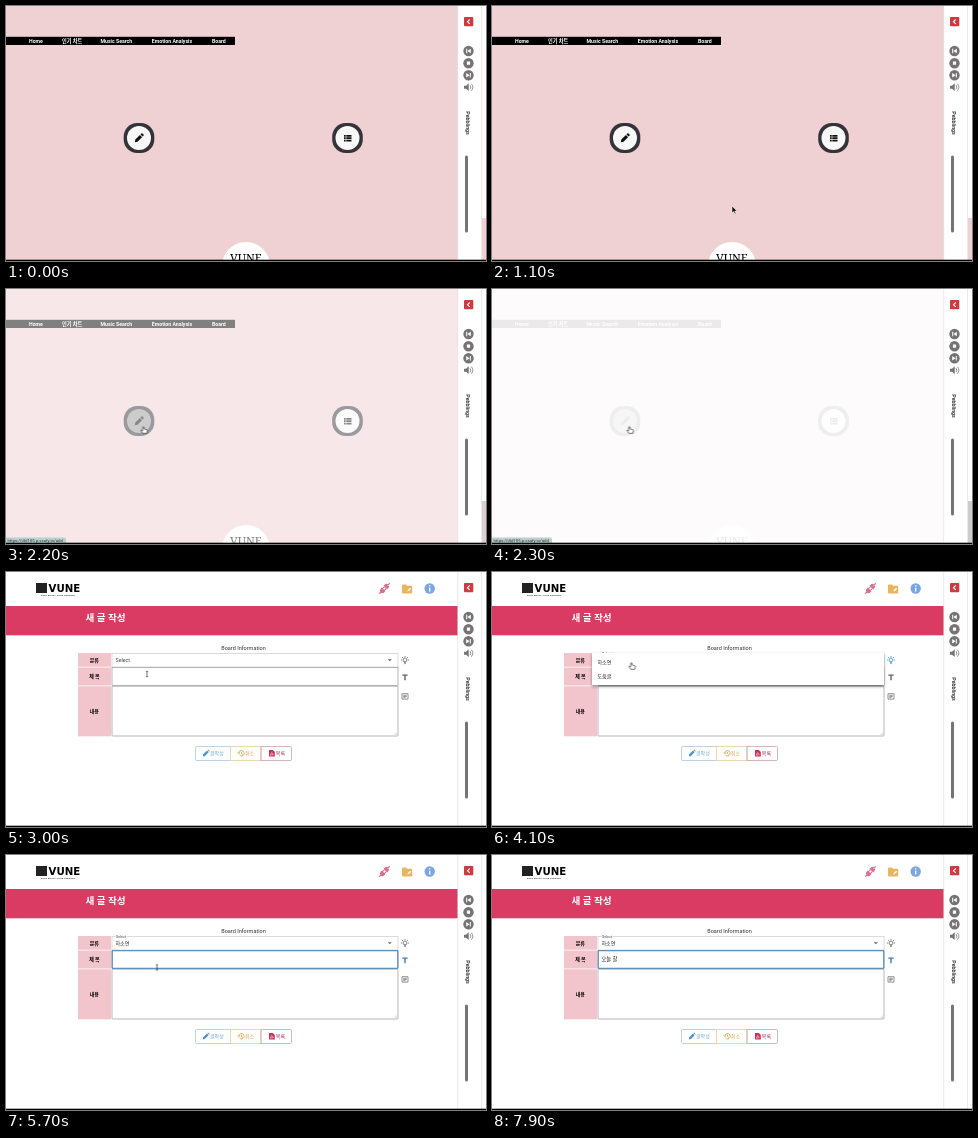
An HTML page for the animation above (8000 ms loop, 480x255 px).

```html
<!DOCTYPE html>
<html lang="ko">
<head>
<meta charset="utf-8">
<title>Board</title>
<style>
html, body { margin: 0; width: 100%; height: 100%; overflow: hidden; background: #fff; }
#stage { position: absolute; left: 0; top: 0; width: 480px; height: 255px; overflow: hidden; }
svg { display: block; }
text, #typed { font-family: Roboto, "Noto Sans CJK KR", "Noto Sans CJK", sans-serif; }
.mid { text-anchor: middle; }
.nav text { font-size: 5.2px; font-weight: 700; fill: #fff; }
.serif { font: 11.5px "Noto Serif", "Liberation Serif", serif; }
.brand { font: 700 10.2px "DejaVu Sans", sans-serif; }
.cells rect { fill: #f2c4cb; }
.cells text { font-size: 5px; font-weight: 900; text-anchor: middle; }
.small { font-size: 5px; fill: #222; }
.box { fill: #fff; stroke: #999; stroke-width: .7; }
.btn { font-size: 5px; }

.a { animation: 8s linear infinite; }
.step { animation-timing-function: step-end; }
.home { animation-name: home; }
.board { animation-name: board; }
.hover { animation-name: hover; }
.status { animation-name: status; }
.thumb { animation-name: thumb; }
.menu { animation-name: menu; transform-origin: 246px 88px; }
.label { animation-name: label; }
.value { animation-name: value; }
.bulb { animation-name: bulb; }
.tee { animation-name: tee; }
.focus { animation-name: value; animation-name: focus; }
.cursor { animation-name: move; animation-timing-function: ease-in-out; }
.arrow { animation-name: arrow; }
.hand { animation-name: hand; }
.beam { animation-name: beam; }

@keyframes home { 0%, 26.4% { opacity: 1 } 27.5% { opacity: .5 } 28.75% { opacity: .08 } 30%, 100% { opacity: 0 } }
@keyframes board { 0%, 31% { opacity: 0 } 35%, 100% { opacity: 1 } }
@keyframes hover { 0%, 24.8% { fill: #f8f8f8 } 26%, 100% { fill: #999 } }
@keyframes status { 0%, 25% { opacity: 0 } 26.25% { opacity: .45 } 27.5%, 35.5% { opacity: 1 } 36.25%, 100% { opacity: 0 } }
@keyframes thumb { 0%, 26.4% { fill: #efd0d3; opacity: 1 } 28.75%, 33.7% { fill: #ccc; opacity: 1 } 35%, 100% { fill: #ccc; opacity: 0 } }
@keyframes menu {
  0%, 41.25% { opacity: 0; transform: scale(.75, .56) }
  44%, 57.5% { opacity: 1; transform: none }
  60%, 100% { opacity: 0; transform: scale(.75, .56) }
}
@keyframes label {
  0%, 41.25% { transform: translate(109.5px, 90px); font-size: 5.3px }
  43.7%, 100% { transform: translate(110px, 83.2px); font-size: 3.7px }
}
@keyframes value { 0% { opacity: 0 } 57.5%, 100% { opacity: 1 } }
@keyframes focus { 0% { opacity: 0 } 70%, 100% { opacity: 1 } }
@keyframes bulb { 0% { color: #666 } 41.25% { color: #3f8fd0 } 70%, 100% { color: #666 } }
@keyframes tee { 0% { color: #666 } 70%, 100% { color: #3f7fb8 } }
@keyframes move {
  0%, 13.75% { transform: translate(240px, 200px) }
  24.5%, 32% { transform: translate(137.5px, 138px) }
  37%, 38% { transform: translate(141px, 102px) }
  41%, 44% { transform: translate(141px, 88px) }
  51.25%, 58.5% { transform: translate(139.5px, 91px) }
  68%, 100% { transform: translate(151px, 112.5px) }
}
@keyframes arrow { 0% { opacity: 0 } 13.75% { opacity: 1 } 25%, 100% { opacity: 0 } }
@keyframes hand { 0% { opacity: 0 } 25% { opacity: 1 } 34.5% { opacity: 0 } 40% { opacity: 1 } 62%, 100% { opacity: 0 } }
@keyframes beam { 0% { opacity: 0 } 34.5% { opacity: 1 } 40% { opacity: 0 } 62% { opacity: 1 } 81.25%, 100% { opacity: 0 } }

#typed { position: absolute; left: 109.5px; top: 100px; font-size: 5.3px; line-height: 8px; white-space: pre; color: #111; }
#typed::after { content: ""; animation: type 8s step-end infinite; }
@keyframes type {
  0% { content: "" }
  81.25% { content: "ㅇ" }
  83.75% { content: "오" }
  86.25% { content: "온" }
  88.75% { content: "오느" }
  91.25% { content: "오늘" }
  93.75% { content: "오늘 " }
  95% { content: "오늘 ㅎ" }
  96.25% { content: "오늘 하" }
  98.75%, 100% { content: "오늘 할" }
}
</style>
</head>
<body>
<div id="stage">
<svg width="480" height="255" viewBox="0 0 480 255">
  <defs>
    <filter id="shadow" x="-5%" y="-20%" width="110%" height="160%">
      <feDropShadow dx="0" dy="1.5" stdDeviation="1.5" flood-opacity=".4"/>
    </filter>
  </defs>
  <rect width="480" height="255" fill="#fff"/>

  <!-- board form -->
  <g class="a board">
    <rect x="30" y="11" width="11" height="10" fill="#222"/>
    <text class="brand" x="42.5" y="20">VUNE</text>
    <text x="52" y="23.6" class="mid" font-size="2.4" font-weight="700" fill="#444" letter-spacing=".15">SING ENJOY YOUR EVENING</text>

    <g transform="translate(378.5 16.5) rotate(45)" fill="#d8708c">
      <path d="M-2.6-1.2h5.2v-1.6a2.6 2.6 0 0 0-5.2 0zM-.6-7.4h1.2v3h-1.2zM-2.6 1.2h5.2v1.6a2.6 2.6 0 0 1-5.2 0zM-.6 4.6h1.2v2.8h-1.2zM-1.8-1.4h1v3h-1zM.8-1.4h1v3h-1z"/>
    </g>
    <path d="M396 13.5q0-1 1-1h3l1.2 1.3h4q1 0 1 1v5.7q0 1-1 1h-8.200q-1 0-1-1z" fill="#e9b55e"/>
    <path d="M401.500 19.500l.3-1.400 2.400-2.400 1 1-2.400 2.400z" fill="#fff"/>
    <circle cx="423.7" cy="16.500" r="5.200" fill="#7ba6de"/>
    <path d="M423 15.700h1.400v3.700H423zM423 13.200h1.400v1.400H423z" fill="#fff"/>

    <rect y="34" width="452" height="29.300" fill="#d93b62"/>
    <text x="79.500" y="49" font-size="9.600" font-weight="900" fill="#fff">새 글 작성</text>
    <text class="mid" x="237.500" y="78.300" font-size="5.500" fill="#333">Board Information</text>

    <g class="cells">
      <rect x="72" y="81" width="33" height="13.700"/>
      <rect x="72" y="95.500" width="33" height="18"/>
      <rect x="72" y="114.300" width="33" height="50"/>
      <text x="88.300" y="89.700">분류</text>
      <text x="88.500" y="106">제 목</text>
      <text x="88.300" y="141">내용</text>
    </g>

    <rect class="box" x="106" y="81.500" width="286" height="13.500" style="stroke:#ccc"/>
    <rect class="box" x="106" y="95.500" width="286" height="18"/>
    <rect class="box" x="106" y="114.200" width="286" height="49.800" rx=".8"/>
    <path d="M388.500 163l2.500-2.500M390 163l1-1" stroke="#999" stroke-width=".4"/>
    <path d="M381.800 87.200h4l-2 2z" fill="#666"/>
    <text class="a label" fill="#444" stroke="#fff" stroke-width="1.200" paint-order="stroke">Select</text>
    <text class="a step value small" x="109.500" y="90">하소연</text>
    <rect class="a step focus" x="106.200" y="95.700" width="285.600" height="17.600" rx=".8" fill="none" stroke="#4a86b8" stroke-width="1.100"/>

    <g class="a step bulb" fill="none" stroke="currentColor" stroke-width=".8">
      <circle cx="399" cy="88" r="1.900"/>
      <path d="M398 90.200h2M398.200 91.600h1.600M399 85.300v-1.300M396.200 88h-1.300M401.800 88h1.300M397 86l-.9-.9M401 86l.9-.9"/>
    </g>
    <path class="a step tee" d="M396.300 102.500h5.400v1.300h-2v4.400h-1.400v-4.400h-2z" fill="currentColor"/>
    <path d="M396 121.700h6v5.400h-6zM397.300 123.300h3.400M397.300 124.500h3.400M397.300 125.700h2.200" fill="none" stroke="#666" stroke-width=".7"/>

    <g fill="none" stroke-width=".7">
      <path d="M224.500 174.500h-34q-1 0-1 1v12q0 1 1 1h34" stroke="#9cc0dc"/>
      <path d="M224.500 174.500h30.500v14h-30.500z" stroke="#e3c48e"/>
      <path d="M255 174.500h29.500q1 0 1 1v12q0 1-1 1H255z" stroke="#c495a4"/>
    </g>
    <path d="M197 184.200v-1.600l4-4 1.600 1.600-4 4zM201.500 178.100l.6-.6 1.600 1.600-.6.600z" fill="#4b93cb"/>
    <text class="btn" x="204" y="183.300" fill="#6ba5d2">글작성</text>
    <path d="M232.800 181.300a2.700 2.700 0 1 1 .8 1.900M231.600 180.500l1.200 1.200 1.200-1.200M235.500 179.800v1.700l1.200.8" fill="none" stroke="#d99a35" stroke-width=".8"/>
    <text class="btn" x="239" y="183.300" fill="#dda44c">취소</text>
    <path d="M263 178h3.800l2 2v4.600H263z" fill="#cf2f58"/>
    <path d="M264.200 183.200l1.500-2.700 1.600 2.200z" fill="none" stroke="#fff" stroke-width=".5"/>
    <text class="btn" x="269.800" y="183.300" fill="#a8375a">목록</text>

    <g class="a menu">
      <rect x="100" y="81" width="292" height="32" fill="#fff" filter="url(#shadow)"/>
      <text class="small" x="105.500" y="92">하소연</text>
      <text class="small" x="105.500" y="105.600">도움글</text>
    </g>
  </g>

  <!-- landing page -->
  <g class="a home">
    <rect width="452" height="254" fill="#efd0d3"/>
    <g class="nav">
      <rect y="30.800" width="229" height="8.200"/>
      <text x="23" y="36.700">Home</text>
      <text x="56" y="36.700">인기 차트</text>
      <text x="94.500" y="36.700">Music Search</text>
      <text x="145.800" y="36.700">Emotion Analysis</text>
      <text x="206" y="36.700">Board</text>
    </g>
    <g fill="#35333a">
      <rect x="117.700" y="117" width="30.600" height="30" rx="13.500"/>
      <rect x="326.200" y="117" width="30.600" height="30" rx="13.500"/>
    </g>
    <circle class="a hover" cx="133" cy="132" r="12" fill="#f8f8f8"/>
    <circle cx="341.500" cy="132" r="12" fill="#f8f8f8"/>
    <path d="M128.800 136.300l.5-2.700 4.600-4.600 2.200 2.200-4.600 4.600zM134.500 128.400l.8-.8q.6-.5 1.200 0l1 1q.5.600 0 1.200l-.8.800z" fill="#111"/>
    <path d="M338 129.800h1.700M338 132.200h1.700M338 134.600h1.700M340.300 129.800h5.200M340.300 132.200h5.200M340.300 134.600h5.200" stroke="#111" stroke-width="1.700"/>
    <circle cx="240" cy="260" r="24" fill="#fff"/>
    <text class="serif mid" x="240" y="255.500">VUNE</text>
  </g>

  <!-- player sidebar -->
  <path d="M451.700 0v254M475.500 0v254" stroke="#e4e2e3" stroke-width=".7"/>
  <rect class="a thumb" x="476" y="212" width="4" height="42"/>
  <rect x="458" y="11" width="9.300" height="9.300" rx="1" fill="#d0393f"/>
  <path d="M463.700 13.500l-2.200 2.200 2.200 2.200" fill="none" stroke="#fff" stroke-width="1.100"/>
  <g fill="#777375">
    <circle cx="462.500" cy="45" r="5.200"/>
    <circle cx="462.500" cy="57.200" r="5.200"/>
    <circle cx="462.500" cy="69.200" r="5.200"/>
    <path d="M458 79.700h2l2.700-2.400v7.800l-2.700-2.400h-2z"/>
    <rect x="459" y="149.500" width="3" height="77" rx="1.500"/>
  </g>
  <path d="M460.200 42.700h1v4.600h-1zM464.800 42.700v4.600l-3.400-2.300zM460.900 55.600h3.200v3.200h-3.200zM460.200 66.900l3.400 2.300-3.400 2.300zM463.800 66.900h1v4.600h-1z" fill="#fff"/>
  <path d="M464 79.200q1.600 2 0 4M465.300 77.700q3.200 3.500 0 7" fill="none" stroke="#777375" stroke-width=".8"/>
  <text transform="translate(460 105.300) rotate(90)" font-size="5.300" font-weight="500" fill="#222">Pebblings</text>

  <g class="a status">
    <path d="M0 248.500h58q2 0 2 2V254H0z" fill="#b9d0cc"/>
    <text x="1.500" y="253.300" font-size="4.300" fill="#234">https://i4d105.p.ssafy.io/add</text>
  </g>

  <g class="a cursor">
    <path class="a step arrow" d="M0 0v7l1.700-1.500 1.100 2.500 1.100-.5-1.100-2.400h2.200z" fill="#111" stroke="#fff" stroke-width=".5"/>
    <path class="a step hand" d="M-.8 0q.8-.8 1.400 0v2l2.700.7q.7.300.6 1.200l-.6 2.400H-.7l-1.900-2.800q.4-.8 1.800.3z" fill="#fff" stroke="#222" stroke-width=".6"/>
    <path class="a step beam" d="M-1.200-2.800q1.200 0 1.200.6 0-.6 1.200-.6M0-2.200v4.400M-1.200 2.800q1.200 0 1.200-.6 0 .6 1.200.6" fill="none" stroke="#333" stroke-width=".7"/>
  </g>
  <rect y="253.700" width="480" height="1.300"/>
</svg>
<div id="typed"></div>
</div>
</body>
</html>
```
